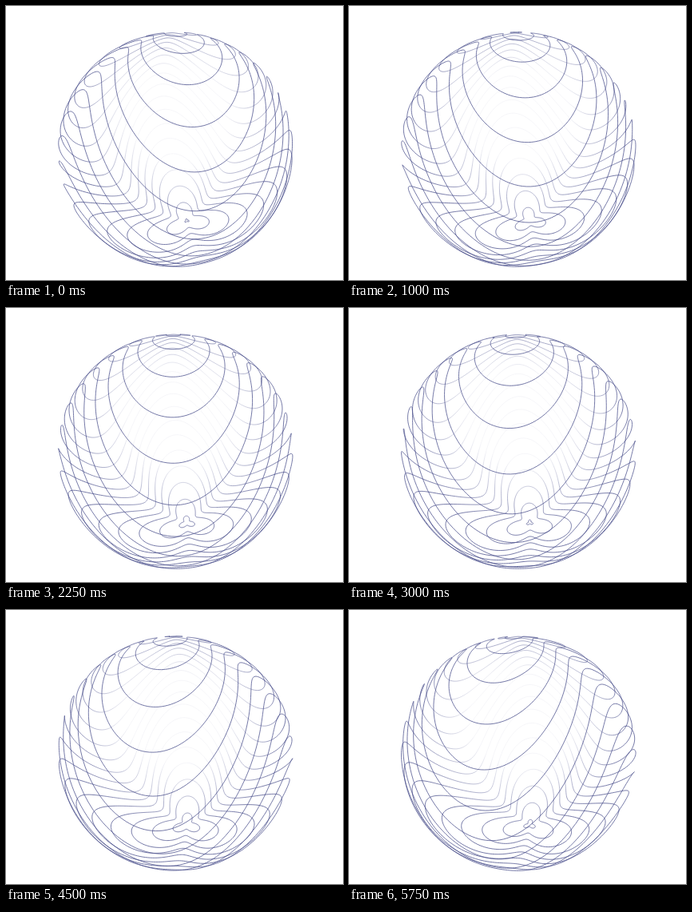
An HTML page with a canvas for the animation above (6 s loop, 422 by 343 pixels).

```html
<!DOCTYPE html>
<html lang="en">
<head>
<meta charset="utf-8">
<title>Flowing contour sphere</title>
<style>
  html, body { margin: 0; width: 100%; height: 100%; overflow: hidden; background: #fff; }
  canvas { display: block; }
</style>
</head>
<body>
<canvas id="stage" width="422" height="343"></canvas>
<script>
const ctx = document.getElementById('stage').getContext('2d');
const RAD = Math.PI / 180;
const CENTER = { x: 212.3, y: 179.6 };
const CAMERA = 2.04;               // camera distance in sphere radii
const FOCAL = 261;
const TILT = 60.6 * RAD;           // angle between the axis and the line of sight
const COS_TILT = Math.cos(TILT), SIN_TILT = Math.sin(TILT);
const SPACING = 10, DRIFT = 3.15;  // degrees between rings, degrees per second
const WAVE = 0.44;                 // wave height in radians
const STEPS = 300;
const LOOP = 6000, TICK = 250;

function project(colat, lon) {
  const side = Math.sin(colat) * Math.sin(lon);
  const front = Math.sin(colat) * Math.cos(lon);
  const up = Math.cos(colat);
  // The axis is slightly bent: it leans more towards the lower pole.
  const roll = 0.077 - 0.06 * up;
  const x = side * Math.cos(roll) - up * Math.sin(roll);
  const v = up * Math.cos(roll) + side * Math.sin(roll);
  const y = front * COS_TILT - v * SIN_TILT;
  const z = front * SIN_TILT + v * COS_TILT;
  const scale = FOCAL / (CAMERA - z);
  return { x: CENTER.x + x * scale, y: CENTER.y + y * scale, front };
}

function drawRing(base, turn) {
  let last = null;
  for (let i = 0; i <= STEPS; i++) {
    const lon = i / STEPS * 2 * Math.PI;
    const colat = base + WAVE * Math.sin(base) * Math.cos(3 * (lon - turn));
    const p = project(colat, lon);
    if (last) {
      ctx.globalAlpha = Math.min(0.85, Math.max(0.06, 0.8 + 0.95 * p.front));
      ctx.beginPath();
      ctx.moveTo(last.x, last.y);
      ctx.lineTo(p.x, p.y);
      ctx.stroke();
    }
    last = p;
  }
}

function draw(seconds) {
  ctx.globalAlpha = 1;
  ctx.fillStyle = '#fff';
  ctx.fillRect(0, 0, 422, 343);
  ctx.strokeStyle = '#4a4f8c';
  ctx.lineWidth = 0.9;
  const turn = 0.061 * (2.7 - seconds);
  const first = (8.8 + DRIFT * seconds) % SPACING;
  for (let base = first; base < 179.6; base += SPACING) drawRing(base * RAD, turn);
}

const start = performance.now();
let shown = -1;
function frame() {
  const tick = Math.floor((performance.now() - start) % LOOP / TICK);
  if (tick !== shown) {
    draw(tick * TICK / 1000);
    shown = tick;
  }
  requestAnimationFrame(frame);
}
frame();
</script>
</body>
</html>
```
